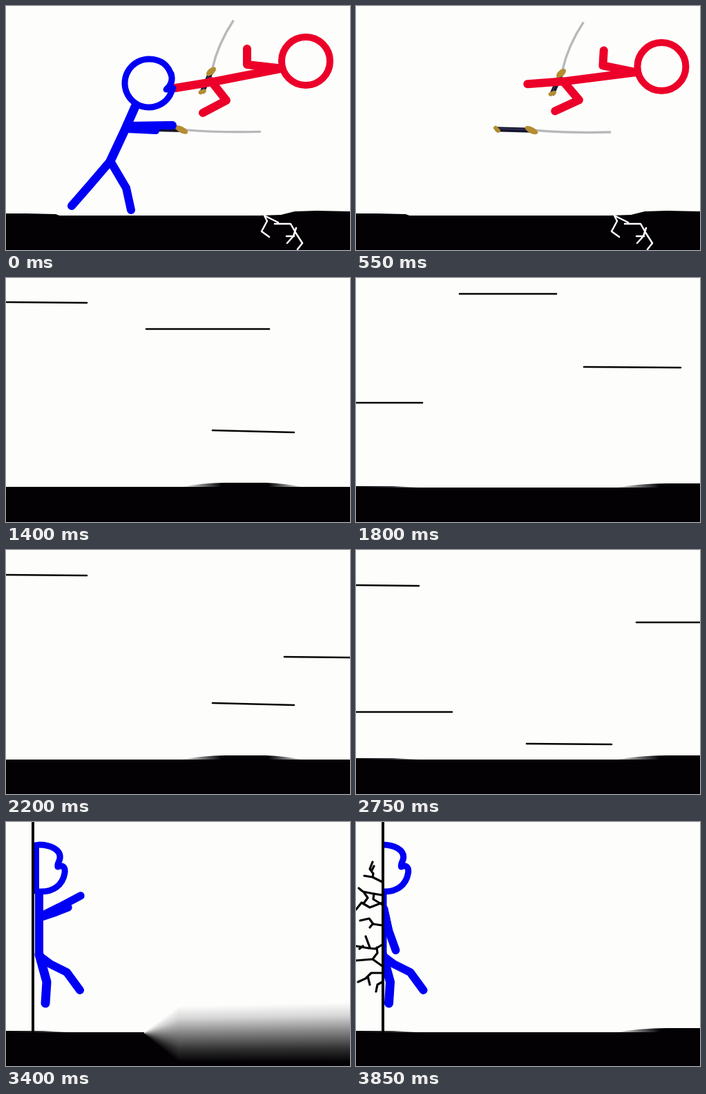
An HTML page with a canvas that plays this animation: 498x354 px, repeating every 4.15 s.

```html
<!DOCTYPE html>
<html lang="en">
<head>
<meta charset="utf-8">
<title>Stick fight</title>
<style>
html, body { margin: 0; width: 100%; height: 100%; overflow: hidden; background: #fdfefc; }
canvas { display: block; }
</style>
</head>
<body>
<canvas id="stage" width="498" height="354"></canvas>
<script>
const W = 498, H = 354, LOOP = 4150, STEP = 50;
const PAPER = '#fdfefc', INK = '#030104', BLUE = '#0000f4', RED = '#ec0029', GOLD = '#b48c32';
const CUT_RUN = 1200, CUT_WALL = 3100, HIT = 3400, REST = 3850;
const c = document.getElementById('stage').getContext('2d');

const clamp = v => Math.max(0, Math.min(1, v));
const prog = (t, a, b) => clamp((t - a) / (b - a));
const mix = (a, b, k) => a.map((v, i) => v + (b[i] - v) * k);

function stroke(d, color, width) {
  c.strokeStyle = color;
  c.lineWidth = width;
  c.stroke(new Path2D(d));
}

function limb(p, color, width = 13) {
  stroke('M' + p.join(' '), color, width);
}

function fill(d, style) {
  c.fillStyle = style;
  c.fill(new Path2D(d));
}

function at(x, y, angle, draw) {
  c.save();
  c.translate(x, y);
  c.rotate(angle);
  draw();
  c.restore();
}

function fadeX(...stops) {
  const g = c.createLinearGradient(0, 0, W, 0);
  for (const [x, a] of stops) g.addColorStop(x / W, `rgba(3,1,4,${a})`);
  return g;
}

// Ground
function floor(y) {
  c.fillStyle = INK;
  c.fillRect(0, y, W, H - y);
}

function midHump(y) {
  fill(`M248 ${y + 1}Q285 ${y - 6} 318 ${y - 6}H375Q405 ${y - 5} 434 ${y + 1}Z`,
    fadeX([255, 0], [312, 1], [380, 1], [432, 0]));
}

function sideHumps(y, right) {
  fill(`M0 ${y - 2}H55L110 ${y + 1}H0Z`, fadeX([0, 1], [50, 0.8], [110, 0]));
  if (right) fill(`M372 ${y + 1}Q410 ${y - 6} 450 ${y - 6}H498V${y + 1}Z`, fadeX([372, 0], [440, 1]));
}

function smear(y) {
  for (let x = 200; x < W; x++) {
    const k = clamp((x - 200) / 50);
    const top = y - 38 * k - Math.max(0, x - 250) * 0.022;
    const end = y + 40 * k + 3;
    const g = c.createLinearGradient(0, top, 0, end);
    g.addColorStop(0, PAPER);
    g.addColorStop(0.22, '#d6d6d6');
    g.addColorStop(0.5, '#808080');
    g.addColorStop(0.78, '#303030');
    g.addColorStop(1, INK);
    c.fillStyle = g;
    c.fillRect(x, top, 1, end - top);
  }
}

// Kick
function sword(x, y, angle, blade, grip, bend) {
  at(x, y, angle, () => {
    c.lineCap = 'butt';
    stroke(`M4 0Q${blade / 2} ${bend} ${blade} 0`, '#b9b9bb', 3.4);
    stroke(`M0 0H${-grip}`, '#15152e', 7);
    stroke(`M-6 -1H${6 - grip}`, '#34345c', 1.5);
    c.lineCap = 'round';
    stroke(`M${-grip} -2L${4 - grip} 2`, GOLD, 6);
    at(0, 0, 0.45, () => {
      c.fillStyle = GOLD;
      c.beginPath();
      c.ellipse(0, 0, grip * 0.1 + 5, 4.5, 0, 0, 7);
      c.fill();
    });
  });
}

const redParts = [
  [[397, 91, 300, 110, 245, 119], [408, 99, 302, 109, 250, 110]],
  [[297, 109, 319, 137, 285, 155], [302, 110, 325, 136, 290, 151]],
  [[393, 90, 349, 85, 349, 62], [404, 98, 362, 87, 364, 66]]
];

function red(k) {
  for (const [a, b] of redParts) limb(mix(a, b, k), RED, 12);
  const [x, y] = mix([434, 80], [447, 92.5], k);
  c.lineWidth = 10;
  c.beginPath();
  c.arc(x, y, 35, 0, 7);
  c.stroke();
}

function struckBlue(k) {
  at(-330 * k * k - 30 * k, 6 * k, -0.12 * k, () => {
    stroke('M240 103C236 86 224 77 207 77A35 35 0 1 0 237 130L242 119L232 121Q243 112 239 98', BLUE, 9);
    limb([187, 146, 172, 180, 151, 225], BLUE);
    limb([151, 225, 122, 259, 95, 290], BLUE, 12);
    limb([151, 225, 174, 264, 181, 296], BLUE, 12);
    limb([175, 174, 241, 173], BLUE, 12);
    limb([175, 179, 217, 181], BLUE, 10);
  });
}

function kick(t) {
  const k = t / 850;
  floor(304);
  fill('M0 301L30 301L72 302L80 305H0Z', INK);
  fill('M335 305L398 303L418 298L450 297L498 298V306H335Z', INK);
  stroke('M394 314L374 304L378 312L370 327L381 335M389 316H412L420 330L429 344L422 353' +
    'M420 322L416 334L407 344M406 334L417 334', '#fff', 2.5);
  sword(297, 95 + 4 * k, -1.16, 81, 34, -7);
  sword(254, 179.5 + k, 0.025, 115, 52, 3);
  red(k);
  const fly = prog(t, 50, 500);
  if (fly < 1) struckBlue(fly);
}

// Flight: speed lines as x1, y1, x2, y2
const lineSets = [
  [[-5, 35, 117, 36], [403, 154, 503, 155], [299, 221, 417, 224]],
  [[-5, 50, 91, 51], [406, 104, 503, 104], [-5, 234, 139, 234], [247, 280, 370, 281]],
  [[150, 22, 290, 22], [330, 128, 470, 129], [-5, 180, 96, 180]],
  [[60, 94, 205, 95], [366, 48, 503, 48], [180, 258, 322, 258]],
  [[-5, 35, 117, 36], [203, 74, 381, 74], [299, 221, 417, 224]]
];

function flight(t) {
  const n = Math.floor((t - CUT_RUN) / STEP) % 5;
  const dy = t < 1800 ? 0 : 1;
  const y = 303 + dy;
  floor(y);
  if (n === 0 || n === 4) midHump(y);
  else sideHumps(y, true);
  at(0, dy, 0, () => lineSets[n].forEach(p => limb(p, '#050505', 2.6)));
}

// Wall
const cracks = [
  'M38 87L24 80L12 78M24 80L25 75L20 68L24 58M23 70L26 64',
  'M38 106L25 104L10 101L4 96M12 103L17 110L11 118',
  'M38 117L20 124L8 117L0 127M38 120L25 112L26 104',
  'M38 150L25 148L19 140L6 143M24 148L20 153',
  'M38 178L28 184L18 183L0 180M20 182L14 166M10 180L5 184',
  'M38 209L24 199L0 201M24 199L31 190L30 182',
  'M38 219L22 219L14 227L3 232M17 224L20 236M38 232L31 236L29 246'
];
const arms = [[48, 138, 78, 123, 108, 107], [48, 139, 72, 131, 90, 124]];
const armDown = [50, 126, 57, 158, 67, 186];

function wallBlue(t) {
  const enter = 1 - prog(t, 3200, 3350), slump = prog(t, HIT, 3700);
  at(470 * enter - 9.5 * slump, -10 * enter, 0, () => {
    stroke('M48 33C64 33 80 40 78 53C77 58 74 60 75 65C84 61 86 68 85 74C82 92 68 102 48 101', BLUE, 9);
    stroke('M44 33V101', BLUE, 8);
    limb([48, 104, 48, 192], BLUE, 12);
    limb([48, 192, 59, 232, 57, 263], BLUE);
    limb([48, 194, 64, 206, 88, 218, 107, 244], BLUE, 12);
    for (const a of arms) limb(mix(a, armDown, slump * slump), BLUE, 11.5);
  });
}

function wall(t) {
  const y = 305, moving = t < 3450;
  const x = 39 - 50 * (1 - prog(t, CUT_WALL, 3250));
  floor(y);
  sideHumps(y, !moving);
  if (moving) smear(y);
  c.save();
  c.beginPath();
  c.rect(x, 0, W, H);
  c.clip();
  wallBlue(t);
  c.restore();
  c.lineCap = 'butt';
  limb([x, 0, x, y], INK, 4);
  c.lineCap = 'round';
  const grown = prog(t, HIT, 3600);
  if (grown > 0) {
    c.save();
    c.beginPath();
    c.rect(39 - 40 * grown, 0, 40 * grown, H);
    c.clip();
    cracks.forEach(d => stroke(d, INK, 3.2));
    c.restore();
  }
}

function draw(ms) {
  const t = ms < 100 ? 0 : Math.min(REST, Math.floor(ms / STEP) * STEP);
  c.fillStyle = PAPER;
  c.fillRect(0, 0, W, H);
  c.lineCap = c.lineJoin = 'round';
  if (t < CUT_RUN) kick(t);
  else if (t < CUT_WALL) flight(t);
  else wall(t);
}

const start = performance.now();
function tick() {
  draw((performance.now() - start) % LOOP);
  requestAnimationFrame(tick);
}
tick();
</script>
</body>
</html>
```
